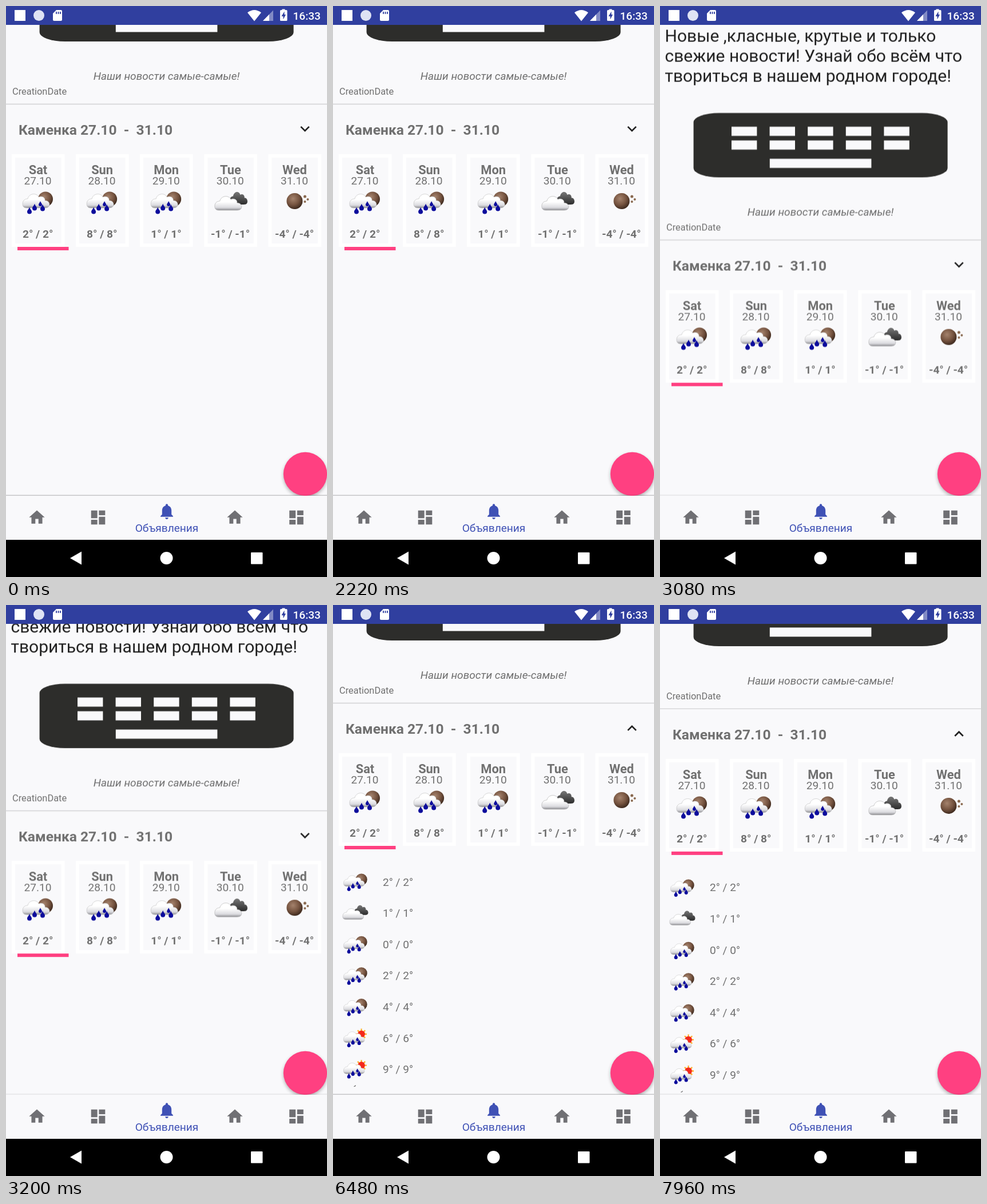
Animation of 561x998 px, one loop 8 s. Source, as an HTML page:

```html
<!DOCTYPE html>
<html lang="ru">
<head>
<meta charset="utf-8">
<title>Лента и погода</title>
<style>
html, body { margin: 0; width: 100%; height: 100%; overflow: hidden; background: #f9f9fb; }
svg { display: block; width: 561px; height: 998px; font-family: Roboto, sans-serif; }
text { fill: #707070; }
.mid { text-anchor: middle; }
.bold { font-weight: 700; }
.s12 { font-size: 16.4px; }
.s14 { font-size: 19.1px; }
.s16 { font-size: 21.84px; }
.s18 { font-size: 24.57px; }
.s22 { font-size: 30px; }

#page { animation: scroll 8s linear infinite; }
#list, #up { animation: show 8s step-end infinite; }
#down { animation: hide 8s step-end infinite; }
#glow { transform-origin: 280px 856px; animation: glow 8s linear infinite; }

@keyframes scroll {
  0%, 33.6% { transform: translateY(0); }
  34.9% { transform: translateY(12px); }
  35.875%, 36.9% { transform: translateY(39.5px); }
  37% { transform: translateY(72px); }
  38.5%, 39% { transform: translateY(237.5px); }
  41% { transform: translateY(140px); }
  42.5% { transform: translateY(38px); }
  43.625%, 95% { transform: translateY(0); }
  99.5%, 100% { transform: translateY(9.9px); }
}
@keyframes show { 0% { visibility: hidden; } 81%, 100% { visibility: visible; } }
@keyframes hide { 0% { visibility: visible; } 81%, 100% { visibility: hidden; } }
@keyframes glow {
  0%, 43.6% { opacity: 0; transform: scaleY(.1); }
  45.2%, 47.5% { opacity: .07; transform: scaleY(.48); }
  50.1%, 84.9% { opacity: 0; transform: scaleY(.1); }
  89%, 91% { opacity: .1; transform: scaleY(1); }
  94.9%, 100% { opacity: 0; transform: scaleY(.3); }
}
</style>
</head>
<body>
<svg viewBox="0 0 561 998">
  <defs>
    <radialGradient id="brown" cx=".4" cy=".35" r=".65">
      <stop offset="0" stop-color="#a5836d"/><stop offset=".6" stop-color="#765440"/><stop offset="1" stop-color="#412c20"/>
    </radialGradient>
    <linearGradient id="white" x2="0" y2="1">
      <stop offset=".4" stop-color="#fff"/><stop offset=".8" stop-color="#dcdce0"/><stop offset="1" stop-color="#8e8e92"/>
    </linearGradient>
    <linearGradient id="dark" x2="0" y2="1">
      <stop offset="0" stop-color="#777"/><stop offset="1" stop-color="#2c2c2c"/>
    </linearGradient>
    <filter id="soft" x="-30%" y="-30%" width="160%" height="160%"><feGaussianBlur stdDeviation="3"/></filter>
    <path id="cloud" d="M-27 3c0-7 5-9 9-9c2-10 16-11 19-3c6-3 12 1 11 6c6 0 8 4 8 7c0 5-5 6-9 6H-20c-5 0-7-3-7-7z"/>
    <path id="drop" d="M0-5.5C1-2 4 0 4 2.5a4 4 0 0 1-8 0C-4 0-1-2 0-5.5z" fill="#0c0c9c"/>
    <g id="shower">
      <use href="#cloud" fill="url(#white)" stroke="#bbb" stroke-width=".6"/>
      <use href="#drop" x="-15" y="14"/><use href="#drop" x="-6" y="8"/><use href="#drop" x="8" y="9"/>
      <use href="#drop" transform="translate(4 2) scale(.75)"/>
    </g>
    <g id="rain"><circle cx="13" cy="-5.5" r="13" fill="url(#brown)"/><use href="#shower"/></g>
    <g id="sunrain">
      <g stroke="#ffae2b" stroke-width="3">
        <path d="M13-21V3M1-9H25M4.500-17.500L21.500-.500M21.500-17.500L4.500-.500"/>
      </g>
      <circle cx="13" cy="-9" r="8" fill="#f4281c"/><use href="#shower"/>
    </g>
    <g id="cloudy">
      <use href="#cloud" transform="translate(15 -3) scale(.66 .9)" fill="url(#dark)"/>
      <use href="#cloud" transform="translate(-2 6)" fill="url(#white)" stroke="#aaa" stroke-width=".6"/>
    </g>
    <g id="night">
      <circle r="14" fill="url(#brown)"/>
      <g fill="#8a6a50"><circle cx="18" cy="-8" r="2.500"/><circle cx="23" cy="-3" r="2"/><circle cx="18" cy="1" r="2"/></g>
    </g>
    <path id="home" d="M10 20v-6h4v6h5v-8h3L12 3 2 12h3v8z"/>
    <path id="board" d="M3 13h8V3H3v10zm0 8h8v-6H3v6zm10 0h8V11h-8v10zm0-18v6h8V3h-8z"/>
    <path id="bell" d="M12 22c1.100 0 2-.9 2-2h-4c0 1.100.89 2 2 2zm6-6v-5c0-3.070-1.640-5.640-4.500-6.320V4c0-.83-.67-1.500-1.500-1.500s-1.500.67-1.500 1.500v.68C7.630 5.360 6 7.920 6 11v5l-2 2v1h16v-1l-2-2z"/>
    <path id="more" d="M16.590 8.590 12 13.170 7.410 8.590 6 10l6 6 6-6z"/>
    <path id="less" d="M12 8l-6 6 1.410 1.410L12 10.830l4.590 4.580L18 14z"/>
  </defs>

  <rect width="561" height="998" fill="#f9f9fb"/>

  <g id="page">
    <g id="news"></g>
    <text class="s14 mid" x="280.500" y="129" font-style="italic">Наши новости самые-самые!</text>
    <text class="s12" x="11" y="155">CreationDate</text>
    <path d="M0 171.500H561M0 855.500H561" stroke="#d2d2d4" stroke-width="1.400"/>
    <text class="s18 bold" x="22" y="225">Каменка 27.10&#160; -&#160; 31.10</text>
    <g id="arrow" fill="#222"></g>
    <g id="days"></g>
    <rect x="20" y="421" width="89.500" height="6" fill="#ff4081"/>
    <g id="list"></g>
  </g>

  <path id="glow" d="M0 856C120 741.500 441 741.500 561 856z" fill="#3f51b5" opacity="0"/>

  <circle cx="523" cy="821" r="38" fill="#000" opacity=".3" filter="url(#soft)"/>
  <circle cx="523" cy="818" r="38.200" fill="#ff4081"/>

  <rect y="854" width="561" height="2" fill="#000" opacity=".06"/>
  <rect y="856" width="561" height="77" fill="#f9f9fb"/>
  <g id="tabs" fill="#707074"></g>
  <text class="s14 mid" x="281" y="919" style="fill:#3f51b5">Объявления</text>

  <rect y="933" width="561" height="65"/>
  <g fill="#fff">
    <path d="M112 965L132 953.500V976.500z"/>
    <circle cx="280.500" cy="965" r="11"/>
    <rect x="428" y="955" width="20.500" height="20.500" rx="1"/>
  </g>

  <rect width="561" height="33" fill="#303f9f"/>
  <g fill="#fff">
    <rect x="15" y="7" width="19" height="19"/>
    <circle cx="57.500" cy="16.500" r="9.500" fill="#dfe3f4"/>
    <path d="M88 7h8q2 0 2 2v15q0 2-2 2H84q-2 0-2-2V13z"/>
    <path d="M88 10v4M91.500 10v4M95 10v4" stroke="#303f9f" stroke-width="1.800"/>
    <path d="M422 11.500Q434 2.500 446 11.500L434 26.500z"/>
    <path d="M449 26L467 7.500V26z" opacity=".4"/>
    <path d="M449 26L460 14.700V26z"/>
    <path d="M482.500 7V5.500h5V7H490q1.500 0 1.500 1.500V24.500q0 1.500-1.500 1.500H480.500q-1.500 0-1.500-1.500V8.500q0-1.500 1.500-1.500z"/>
    <path d="M486.500 9.500L481.500 18h3v5.500L489 15h-2.500z" fill="#303f9f"/>
    <text x="501.500" y="24" class="s14" font-weight="500" style="fill:#fff">16:33</text>
  </g>
</svg>
<script>
const fill = (id, parts) => { document.getElementById(id).innerHTML = parts.join(''); };
const text = (x, y, cls, s) => `<text x="${x}" y="${y}" class="${cls}">${s}</text>`;
const rect = (x, y, w, h, color) => `<rect x="${x}" y="${y}" width="${w}" height="${h}" fill="${color}"/>`;
const icon = (name, x, y, k = 1) => `<use href="#${name}" transform="translate(${x} ${y}) scale(${k})"/>`;
// 24-unit glyph centred on (x, y)
const glyph = (name, x, y) => icon(name, x - 16.38, y - 16.38, 1.365);
const temp = n => `${n}° / ${n}°`;

// headline and keyboard picture
const lines = ['Новые ,класные, крутые и только', 'свежие новости! Узнай обо всём что', 'твориться в нашем родном городе!'];
const keys = [];
for (let r = 0; r < 2; r++)
  for (let c = 0; c < 5; c++) keys.push(rect(125 + 66.6 * c, -26.5 + 24 * r, 44.4, 16, '#f9f9fb'));
fill('news', [
  ...lines.map((s, i) => `<text x="8.5" y="${-175.5 + 35.3 * i}" class="s22" style="fill:#202020">${s}</text>`),
  '<rect x="58.600" y="-50.500" width="444" height="112.500" rx="44.400" ry="16" fill="#2d2d2b"/>',
  ...keys,
  rect(191.8, 29.5, 177.6, 16, '#f9f9fb')
]);

fill('arrow', [
  `<g id="down">${glyph('more', 522.5, 214.6)}</g>`,
  `<g id="up">${glyph('less', 522.5, 215.4)}</g>`
]);

const days = [['Sat', 'rain', 2], ['Sun', 'rain', 8], ['Mon', 'rain', 1], ['Tue', 'cloudy', -1], ['Wed', 'night', -4]];
fill('days', days.map(([name, sky, t], i) => {
  const x = 56 + 112.1 * i;
  return `<rect x="${x - 43}" y="262" width="86.500" height="156" fill="none" stroke="#fff" stroke-width="6"/>` +
    text(x, 294, 's16 bold mid', name) +
    text(x - .5, 312, 's14 mid', `${27 + i}.10`.replace('32', '1')) +
    icon(sky, sky === 'cloudy' ? x + 1.5 : x, sky === 'rain' ? 343 : 341) +
    text(x - .3, 405, 's14 bold mid', temp(t));
}));

const hours = [['rain', 2], ['cloudy', 1], ['rain', 0], ['rain', 2], ['rain', 4], ['sunrain', 6], ['sunrain', 9]];
fill('list', [
  ...hours.map(([sky, t], i) => {
    const y = 484 + 54.6 * i;
    return icon(sky, 39.5, sky === 'cloudy' ? y - 1.5 : y, .78) + text(87, y + 6.5, 's14', temp(t));
  }),
  '<path d="M36.500 841.500q2.500 0 3-2" fill="none" stroke="#555" stroke-width="1.200"/>'
]);

fill('tabs', [
  glyph('home', 54, 893.8), glyph('board', 161, 894),
  `<g fill="#3f51b5">${glyph('bell', 281, 883.3)}</g>`,
  glyph('home', 400, 893.8), glyph('board', 507.5, 894)
]);
</script>
</body>
</html>
```
